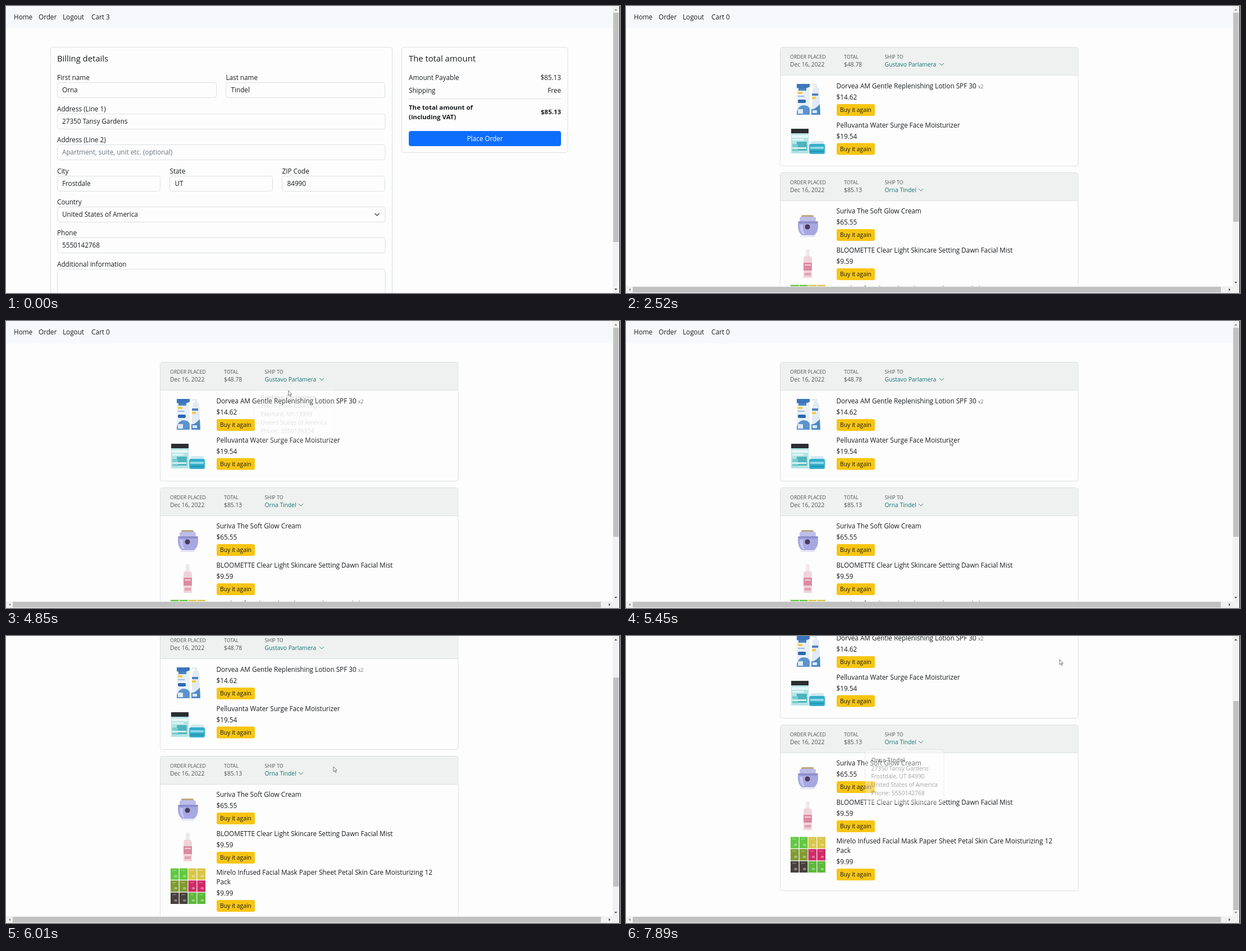
These frames come from a looping animation (1093x512 px, 7990 ms). An HTML page:

```html
<!DOCTYPE html>
<html lang="en">
<head>
<meta charset="utf-8">
<title>Checkout and order history</title>
<style>
  html, body { margin: 0; width: 100%; height: 100%; overflow: hidden; background: #fcfdfc; }
  svg { display: block; width: 100vw; height: 100vh; }
  text { font-family: "Open Sans", "Noto Sans", sans-serif; fill: #191c1f; white-space: pre; }
  .bold { font-weight: 700; }
  .grey { fill: #6c757d; }
  .dim { fill: #4f5457; }
  .link { fill: #0f7476; }
  .white { fill: #fff; }
  .end { text-anchor: end; }
  .mid { text-anchor: middle; }
</style>
</head>
<body>
<svg id="stage" viewBox="0 0 1093 512"></svg>
<script>
const LOOP = 7990, LAST_CHANGE = 7890;
const BODY = 11.73, SMALL = 10.3, TINY = 8.86, TITLE = 14.8;

// Text is placed by the middle of its capitals, on a whole-pixel baseline.
const text = (x, mid, str, size = BODY, cls = '') =>
  `<text x="${x}" y="${Math.round(mid + size * .357)}" font-size="${size}" class="${cls}">${str}</text>`;
const rect = (x, y, w, h, fill, r = 0, more = '') =>
  `<rect x="${x}" y="${y}" width="${w}" height="${h}" rx="${r}" fill="${fill}" ${more}/>`;
const box = (x, y, w, h, stroke = '#dcdfe1', fill = '#fdfdfd') =>
  rect(Math.floor(x) + .5, Math.floor(y) + .5, w, h, fill, 4, `stroke="${stroke}"`);
const path = (d, fill, more = '') => `<path d="${d}" fill="${fill}" ${more}/>`;
const chevron = (x, y, color, width = .9) =>
  path(`M${x - 4} ${y - 2}l4 4 4-4`, 'none', `stroke="${color}" stroke-width="${width}"`);

const nav = cart => rect(0, 0, 1080, 40, '#f7f8fb') +
  text(14, 20, 'Home') + text(58, 20, 'Order') + text(101, 20, 'Logout') + text(152, 20, 'Cart ' + cart);

function field(x, y, w, label, value = '', cls = '', h = 27) {
  return text(x, y - 8.5, label) + box(x, y, w, h) + text(x + 9, y + 13.5, value, BODY, cls);
}

function billing() {
  return nav(3) + box(79, 73, 608, 460) + text(91, 94, 'Billing details', TITLE) +
    field(91, 136.5, 283, 'First name', 'Orna') + field(391.5, 136.5, 283, 'Last name', 'Tindel') +
    field(91, 192, 583.5, 'Address (Line 1)', '27350 Tansy Gardens') +
    field(91, 247.5, 583.5, 'Address (Line 2)', 'Apartment, suite, unit etc. (optional)', 'grey') +
    field(91, 303, 183, 'City', 'Frostdale') + field(291.5, 303, 183, 'State', 'UT') +
    field(491.5, 303, 183, 'ZIP Code', '84990') +
    field(91, 358, 583.5, 'Country', 'United States of America') + chevron(660.5, 372, '#343a40', 1.2) +
    field(91, 413.5, 583.5, 'Phone', '5550142768') +
    field(91, 469, 583.5, 'Additional information', '', '', 80) +
    box(704, 73, 295.5, 188) + text(717, 94, 'The total amount', TITLE) +
    text(717, 128, 'Amount Payable') + text(988, 128, '$85.13', BODY, 'end') +
    text(717, 151, 'Shipping') + text(988, 151, 'Free', BODY, 'end') +
    rect(717, 165, 271, 1, '#dcdfe1') +
    text(717, 180.5, 'The total amount of', 11.45, 'bold') + text(717, 197.5, '(including VAT)', 11.45, 'bold') +
    text(988, 189, '$85.13', 11.45, 'bold end') +
    rect(717, 223, 271, 27, '#0d6efd', 4, 'id="place"') + text(852.5, 236.5, 'Place Order', BODY, 'white mid');
}

function orderCard(y, h, total, name, chevronX) {
  return box(274, y, 530.5, h) +
    path(`M275 ${y + 50}V${y + 4.5}q0-3.5 3.5-3.5H801q3.5 0 3.5 3.5V${y + 50}Z`, '#eef1ef') +
    rect(275, y + 50, 530, 1, '#dde1df') +
    ['ORDER PLACED', 'TOTAL', 'SHIP TO'].map((s, i) => text([292, 388, 460.5][i], y + 18, s, TINY, 'dim')).join('') +
    text(292, y + 31, 'Dec 16, 2022', SMALL, 'dim') + text(388, y + 31, total, SMALL, 'dim') +
    text(460.5, y + 31, name, SMALL, 'link') + chevron(chevronX, y + 31, '#147a7c');
}

function item(y, name, price, secondLine) {
  const low = secondLine ? y + 17 : y;
  return text(374.5, y, name) + (secondLine ? text(374.5, low, secondLine) : '') +
    text(374.5, low + 20, price) + rect(375, low + 32, 68, 21, '#f7c512', 3) +
    text(409, low + 42.5, 'Buy it again', SMALL, 'mid');
}

function lotion() {
  return rect(304, 139, 23, 55, '#e9f0f6') + path('M304 139h23v5q-10 6-23 2Z', '#3b76bd') +
    rect(307, 147, 14, 4, '#4d83c2') + rect(306, 153, 8, 4, '#f3cb4b') + rect(306, 160, 12, 2, '#9dbbdd') +
    rect(306, 167, 14, 6, '#2c68b4', 2) + path('M304 188q4-11 12-11 8 0 11 6v11h-23Z', '#5b93cf') +
    rect(306, 184, 9, 8, '#dfe9f3') +
    path('M332 152q0-6 4-8v-2h-5v-3h9v5q4 2 4 8l2 42h-16Z', '#e3ebf2') +
    rect(331, 156, 11, 4, '#4d83c2') + rect(331, 162, 7, 4, '#f3cb4b') +
    path('M330 184q5 2 15-9l1 19h-16Z', '#4d8ac8') + rect(332, 186, 8, 5, '#dfe9f3');
}

function gel() {
  return rect(294, 219, 31, 44, '#b4e4e5') + rect(294, 219, 31, 8, '#2b2d31') +
    rect(295, 230, 29, 5, '#e9f6f6') + rect(296, 237, 20, 3, '#e2f4f4') + rect(304, 242, 18, 16, '#4db4bc') +
    rect(296, 246, 10, 13, '#7accd0') + rect(296, 252, 25, 3, '#d6f0f0') + rect(329, 241, 23, 7, '#cfe9f1', 3) +
    rect(326, 246, 28, 18, '#35aecb', 3) + rect(328, 251, 24, 4, '#8ed8e6') + rect(328, 258, 24, 3, '#249bbb');
}

function creamAndMist() {
  return rect(312, 373, 22, 4, '#b9a981', 2) + rect(309, 376, 29, 9, '#bcbde9', 4) +
    rect(306, 384, 36, 4, '#8f90cd', 2) + path('M306 388h36q1 15-7 21h-22q-8-6-7-21Z', '#a7a8e2') +
    path('M310 390h5q-1 12 3 17h-3q-6-5-5-17Z', '#c6c7f1') +
    '<circle cx="323" cy="394" r="4.5" fill="#4a3a58"/>' + rect(311, 410, 25, 2, '#e0e0f3', 1) +
    rect(320, 434, 7, 12, '#f1e8eb', 2) + path('M316 452q0-5 4-6h6q5 1 5 6v33h-15Z', '#f1d3db') +
    rect(316, 458, 15, 14, '#dc8aa3') + rect(318, 461, 11, 2, '#f5d4dd') + rect(318, 476, 11, 5, '#e3a3b5');
}

function masks() {
  const pairs = ['#62c842', '#d9c648', '#809b34', '#cf2a66', '#47403d', '#5cb83a'];
  let out = '';
  for (let i = 0; i < 12; i++) {
    const x = 293 + i % 4 * 15.8, y = 497.5 + Math.floor(i / 4) * 21.6;
    out += rect(x, y, 14.6, 20.3, pairs[i >> 1]) + rect(x + 3, y + 3, 7, 1.5, '#fff', 0, 'opacity=".3"') +
      rect(x + 6, y + 12, 6, 4, '#fff', 2, 'opacity=".35"');
  }
  return out;
}

function popover(id, x, y, w, name, lines) {
  const c = x + w / 2;
  return `<g id="${id}">` + box(x, y, w, 97, '#cfcfcf', '#fff') +
    path(`M${c - 6} ${y + 1}l6-6 6 6`, '#fff', 'stroke="#cfcfcf"') +
    text(x + 11.5, y + 19, name, SMALL, 'bold') +
    lines.map((s, i) => text(x + 11.5, y + 34 + i * 14.8, s, SMALL)).join('') + '</g>';
}

function orders() {
  return nav(0) + orderCard(73, 212, '$48.78', 'Gustavo Parlamera', 562) +
    item(143, 'Dorvea AM Gentle Replenishing Lotion SPF 30<tspan dx="3" font-size="9" class="grey">x2</tspan>', '$14.62') +
    item(212.5, 'Pelluvanta Water Surge Face Moisturizer', '$19.54') +
    orderCard(297, 296, '$85.13', 'Orna Tindel', 525) +
    item(366, 'Suriva The Soft Glow Cream', '$65.55') +
    item(436, 'BLOOMETTE Clear Light Skincare Setting Dawn Facial Mist', '$9.59') +
    item(505, 'Mirelo Infused Facial Mask Paper Sheet Petal Skin Care Moisturizing 12', '$9.99', 'Pack') +
    lotion() + gel() + creamAndMist() + masks() +
    popover('pop1', 441.5, 117.5, 144, 'Gustavo Parlamera',
      ['20816 Plum Court Apt. 417', 'Ellerford, NY 13999', 'United States of America', 'Phone: 5550198324']) +
    popover('pop2', 425, 341, 140.5, 'Orna Tindel',
      ['27350 Tansy Gardens', 'Frostdale, UT 84990', 'United States of America', 'Phone: 5550142768']);
}

function scrollbars() {
  return rect(1080, 0, 12, 512, '#f1f1f1') + rect(1081, 12, 10, 409, '#c1c1c1', 0, 'id="thumb"') +
    path('M1083 8l2.5-3 2.5 3Z', '#8a8a8a', 'id="up"') + path('M1083 504l2.5 3 2.5-3Z', '#505050', 'id="down"') +
    '<g id="hbar">' + rect(0, 500, 1092, 12, '#f1f1f1') + rect(12, 501, 1047, 10, '#c1c1c1') +
    path('M8 503.5l-3 2.5 3 2.5Z', '#8a8a8a') + path('M1073 503.5l3 2.5-3 2.5Z', '#505050') + '</g>' +
    rect(1092, 0, 1, 512, '#000');
}

const outline = 'stroke="#555" stroke-width=".8" stroke-linejoin="round"';
const cursor = '<g id="cursor">' +
  path('M0 0V9l2-1.8 1.6 3.4 1.4-.7-1.6-3.3H6.2Z', '#fff', `id="arrow" ${outline}`) +
  path('M-.9.8q.9-1.6 1.8 0V4.6l4.6.9q1 .3.9 1.4L5.8 10 5 11.8H.7L-2.2 8.2q-1-1.4 0-1.8l1.3.9Z', '#fff', `id="hand" ${outline}`) +
  '</g>';

const $ = id => document.getElementById(id);
$('stage').innerHTML = rect(0, 0, 1093, 512, '#fcfdfc') +
  `<g id="billing">${billing()}</g><g id="orders">${orders()}</g>` + scrollbars() + cursor;

const clamp = v => Math.max(0, Math.min(1, v));
const ease = v => v * v * (3 - 2 * v);
const ramp = (t, start, len = 150) => clamp((t - start) / len);
const show = (id, on) => $(id).setAttribute('display', on ? 'inline' : 'none');
const set = (id, name, value) => $(id).setAttribute(name, value);

// time, x, y of the pointer tip
const pointer = [
  [0, 690, 530], [820, 735, 400], [920, 735, 400], [1170, 771, 246], [1660, 836, 234], [3300, 790, 330],
  [3880, 491, 110], [4670, 491, 110], [5450, 577, 213], [5490, 577, 213], [5680, 583, 233],
  [6500, 583, 233], [6870, 490, 188], [7760, 490, 188], [7890, 772, 42]
];
const overLink = [[1105, 1940], [3850, 4720], [6840, 7790]];

function pointerAt(t) {
  const next = pointer.findIndex(k => k[0] > t);
  if (next < 0) return pointer[pointer.length - 1].slice(1);
  const a = pointer[next - 1], b = pointer[next], p = ease((t - a[0]) / (b[0] - a[0]));
  return [a[1] + (b[1] - a[1]) * p, a[2] + (b[2] - a[2]) * p];
}

function draw(now) {
  const t = Math.min(now % LOOP, LAST_CHANGE), ordered = t >= 1940;
  const scroll = Math.round(83 * ease(ramp(t, 5740)) + 56 * ease(ramp(t, 6450)));
  show('billing', !ordered);
  show('orders', ordered);
  show('hbar', ordered);
  set('orders', 'transform', `translate(0 ${-scroll})`);
  set('thumb', 'y', Math.round(12 + scroll * .748));
  set('thumb', 'height', ordered ? 373 : 409);
  set('up', 'fill', scroll ? '#505050' : '#8a8a8a');
  set('down', 'fill', scroll === 139 ? '#8a8a8a' : '#505050');
  set('down', 'transform', `translate(0 ${ordered ? -12 : 0})`);

  const hover = ramp(t, 1105);
  set('place', 'fill', `rgb(${13 - 2 * hover},${110 - 16 * hover},${253 - 38 * hover})`);
  set('pop1', 'opacity', ramp(t, 3893) - ramp(t, 4720));
  set('pop2', 'opacity', ramp(t, 6890) - ramp(t, 7798));

  const hand = overLink.some(([from, to]) => t >= from && t < to);
  show('cursor', !ordered || t >= 3300);
  show('hand', hand);
  show('arrow', !hand);
  set('cursor', 'transform', `translate(${pointerAt(t)})`);
  requestAnimationFrame(draw);
}
requestAnimationFrame(draw);
</script>
</body>
</html>
```
